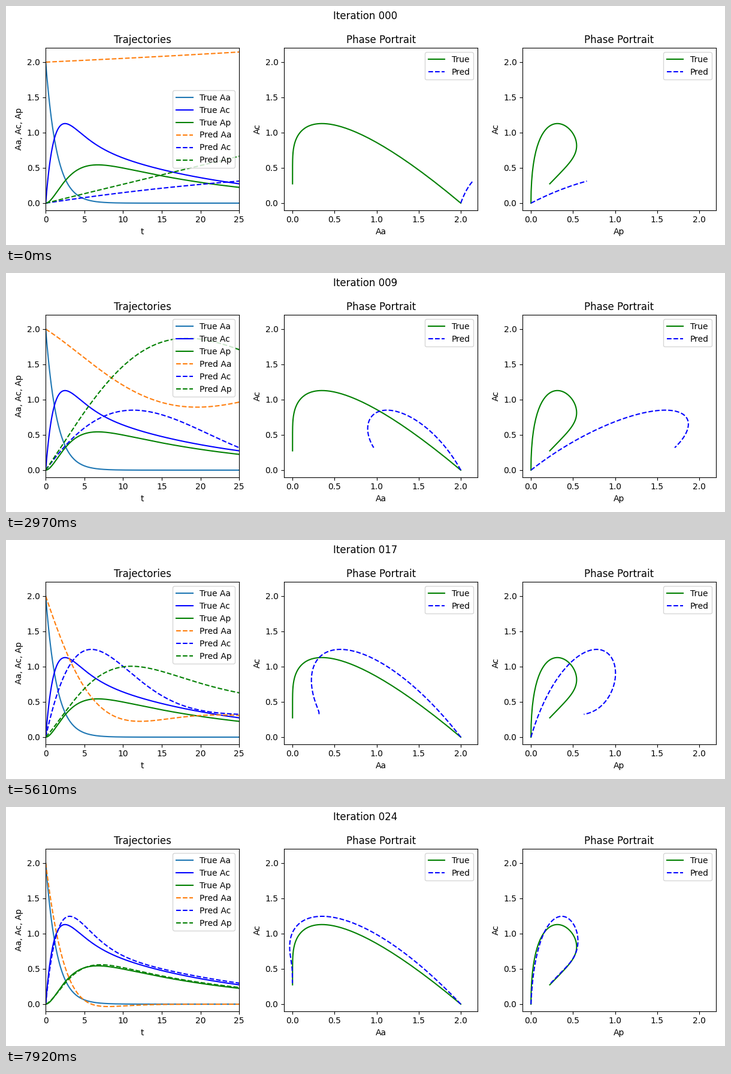
A matplotlib script for the animation above (8 s loop, 1200 by 400 pixels).

```python
import numpy as np
import matplotlib.pyplot as plt
from matplotlib.animation import FuncAnimation

STEP = 50          # ms per drawn frame
LOOP = 8000        # ms per loop
HOLD = 330         # ms per training iteration

t = np.linspace(0, 25, 200)

# Rates of the linear system y' = A y with y = (Aa, Ac, Ap).
TRUE = [[-0.7, 0, 0], [0.7, -0.3, 0.3], [0, 0.2, -0.3]]

# The learned rate matrix at a few iterations; it moves linearly in between.
LEARNED = {
    0: [[0.0025, 0, 0.0017], [0.0083, 0, -0.014], [0.0135, 0, -0.004]],
    3: [[-0.0082, -0.016, -0.001], [0.0112, -0.021, -0.025], [0.031, 0.05, -0.021]],
    7: [[-0.012, -0.158, 0.05], [0.042, 0.07, -0.0615], [0.0595, 0.218, -0.09]],
    11: [[-0.058, -0.1, 0.065], [0.11, 0.021, -0.094], [0.103, 0.155, -0.118]],
    17: [[-0.162, -0.121, 0.134], [0.249, -0.048, -0.105], [0.061, 0.131, -0.132]],
    21: [[-0.298, -0.136, 0.183], [0.392, -0.155, 0.039], [0.038, 0.152, -0.202]],
    24: [[-0.445, -0.121, 0.15], [0.56, -0.222, 0.218], [0.02, 0.156, -0.249]],
}


def solve(rates):
    """Aa, Ac and Ap over time, starting from a dose of 2 in Aa."""
    lam, vec = np.linalg.eig(np.array(rates))
    weights = np.linalg.solve(vec, [2, 0, 0])
    return (vec @ (weights[:, None] * np.exp(np.outer(lam, t)))).real


def rates_at(k):
    entries = np.array(list(LEARNED.values())).reshape(-1, 9).T
    return np.reshape([np.interp(k, list(LEARNED), e) for e in entries], (3, 3))


true = solve(TRUE)
preds = [solve(rates_at(k)) for k in range(25)]

fig, (traj, phase_a, phase_p) = plt.subplots(1, 3, figsize=(12, 4), dpi=100)
title = fig.suptitle("Iteration 000")


def setup(ax, name, xlabel, ylabel, xlim):
    ax.set(title=name, xlabel=xlabel, ylabel=ylabel, xlim=xlim, ylim=(-0.1, 2.2))


setup(traj, "Trajectories", "t", "Aa, Ac, Ap", (0, 25))
names = ("Aa", "Ac", "Ap")
for y, color, name in zip(true, ("C0", "b", "g"), names):
    traj.plot(t, y, color=color, label="True " + name)
lines = [traj.plot(t, y, "--", color=color, label="Pred " + name)[0]
         for y, color, name in zip(preds[0], ("C1", "b", "g"), names)]
traj.legend(loc="best")

orbits = []
for ax, i in ((phase_a, 0), (phase_p, 2)):
    setup(ax, "Phase Portrait", names[i], "Ac", (-0.1, 2.2))
    ax.plot(true[i], true[1], "g-", label="True")
    orbits += ax.plot(preds[0][i], preds[0][1], "b--", label="Pred")
    ax.legend(loc="upper right")

fig.tight_layout()


def update(n):
    k = (n * STEP + STEP - 1) // HOLD
    aa, ac, ap = preds[k]
    title.set_text(f"Iteration {k:03d}")
    for line, y in zip(lines, (aa, ac, ap)):
        line.set_ydata(y)
    for orbit, x in zip(orbits, (aa, ap)):
        orbit.set_data(x, ac)
    return [title, *lines, *orbits]


anim = FuncAnimation(fig, update, frames=LOOP // STEP, interval=STEP,
                     repeat=True, repeat_delay=0)
plt.show()
```
